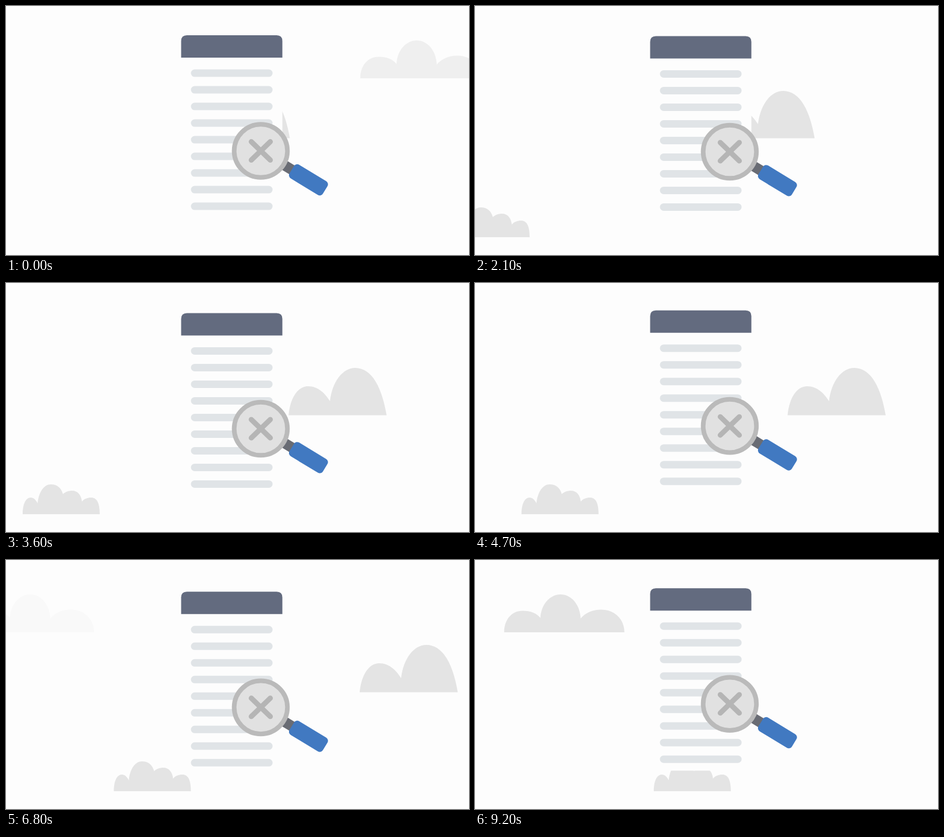
These frames come from a looping animation (805 px wide and 434 px high, 9300 ms). An HTML page:

```html
<!DOCTYPE html>
<html lang="en">
<head>
<meta charset="utf-8">
<title>Nothing found</title>
<style>
  html, body { margin: 0; width: 100%; height: 100%; overflow: hidden; background: #fdfdfd; }
  svg { display: block; width: 100%; height: 100%; }
</style>
</head>
<body>
<svg viewBox="0 0 805 434">
  <g fill="#e4e4e4">
    <path id="wide" d="M0 126C0 104 13 88.500 32 88.500C46 88.500 57 93 63 101C64 78 79 60 98 60C117 60 132 78 133 102C141 92 154 86.500 169 86.500C192 86.500 209 103 209 126Z"/>
    <path id="twin" d="M0 230.500C3 200 16 180 34 180C52 180 64 193 72 206C76 172 94 148 116 148C146 148 163 185 170.500 230.500Z"/>
    <path id="small" d="M0 403C0 386 5 374 14 374C19 374 23 378 26 384C28 364 37 351 49 351C60 351 67 357 70 368C74 364 80 362 86 362C96 362 102 370 103 381C107 376 113 374 119 374C129 374 134 383 134 403Z"/>
  </g>
  <g id="page">
    <path fill="#fdfdfd" d="M304.500 30h176v288h-176z"  transform="translate(0 30)" visibility="hidden"/>
    <rect x="304" y="10" width="176.500" height="308" fill="#fdfdfd"/>
    <path fill="#636b7f" d="M304.500 39V10Q304.500 0 314.500 0H470.500Q480.500 0 480.500 10V39Z"/>
    <g id="lines" stroke="#e0e4e7" stroke-width="13" stroke-linecap="round"></g>
    <g transform="translate(443 201.500)">
      <g transform="rotate(31.300)">
        <rect x="46" y="-9" width="20" height="18" fill="#696c74"/>
        <rect x="63" y="-14" width="68" height="28" rx="6.500" fill="#4179c1"/>
      </g>
      <circle r="46.300" fill="#e1e1e1" stroke="#bababa" stroke-width="8"/>
      <path d="M-16.500-16L16.500 16M16.500-16L-16.500 16" stroke="#b5b5b5" stroke-width="9" stroke-linecap="round"/>
    </g>
  </g>
</svg>
<script>
const LOOP = 9300, STEP = 100, BOB = 3900;
const el = id => document.getElementById(id);
const page = el("page"), wide = el("wide"), twin = el("twin"), small = el("small");

el("page").querySelector("[visibility]").remove();
for (let i = 0; i < 9; i++) {
  const line = document.createElementNS("http://www.w3.org/2000/svg", "path");
  line.setAttribute("d", `M328 ${66 + i * 29}H457`);
  el("lines").append(line);
}

// Linear interpolation through [time, value] points.
function along(points, t) {
  if (t <= points[0][0]) return points[0][1];
  for (let i = 1; i < points.length; i++) {
    const [t0, v0] = points[i - 1], [t1, v1] = points[i];
    if (t <= t1) return v0 + (v1 - v0) * (t - t0) / (t1 - t0);
  }
  return points[points.length - 1][1];
}

function place(node, x, y, opacity = 1) {
  node.setAttribute("transform", `translate(${x.toFixed(2)} ${y.toFixed(2)})`);
  node.setAttribute("opacity", opacity);
}

// Mostly steady rise and fall, slightly rounded at the turns.
function bob(t) {
  const phase = (t - 900 + BOB) % BOB / BOB;
  const ramp = 1 - Math.abs(1 - 2 * phase);
  const wave = (1 - Math.cos(2 * Math.PI * phase)) / 2;
  return 47.3 + 8.2 * (0.75 * ramp + 0.25 * wave);
}

function draw(t) {
  place(page, 0, bob(t));
  if (t < 4000) {
    place(wide, 616 + t * 0.035, 0, along([[0, 0.55], [1400, 0]], t));
  } else {
    place(wide, along([[6800, -56], [8200, -2], [9300, 56]], t), 0,
      along([[6500, 0], [6800, 0.2], [7700, 1]], t));
  }
  place(twin, along([[0, 323], [2100, 420], [4700, 543.5], [9300, 700]], t), 0,
    along([[8300, 1], [8900, 0]], t));
  place(small, along([[2100, -39], [3600, 29], [5000, 95], [9300, 316]], t), 0,
    t < 2100 ? 0 : 1);
}

function tick() {
  const t = performance.now() % LOOP;
  draw(Math.floor(t / STEP) * STEP);
  requestAnimationFrame(tick);
}
tick();
</script>
</body>
</html>
```
